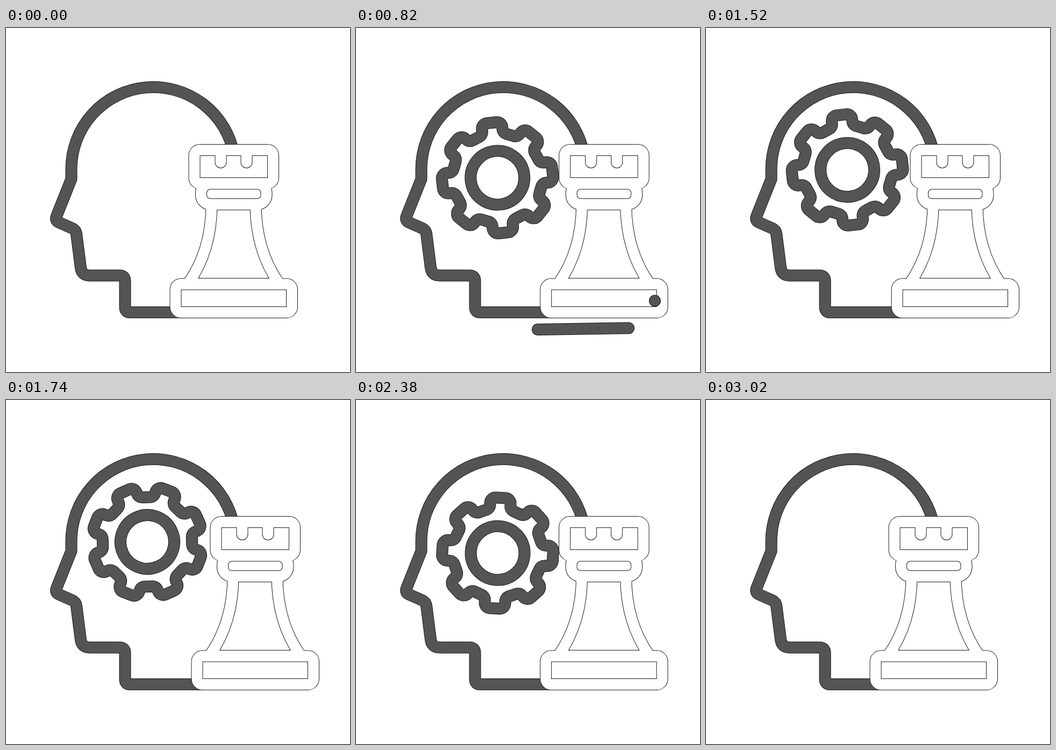
Recreate the animation shown at these times as an HTML page with a canvas. Size 640 by 640 pixels, loop 3120 ms.

```html
<!DOCTYPE html>
<html lang="en">
<head>
<meta charset="utf-8">
<style>
  html, body { margin: 0; width: 640px; height: 640px; overflow: hidden; background: #fff; }
  canvas { display: block; }
</style>
</head>
<body>
<canvas id="stage" width="640" height="640"></canvas>
<script>
const ctx = document.getElementById('stage').getContext('2d');
const LOOP = 3120, DARK = '#545454', EDGE = '#1c1c1c';

const head = new Path2D(`M380 529H231Q221.5 529 221.5 519.5V470.5Q221.5 460.5 211.5 460.5
  H156Q141 460.5 139 446L131 383Q130 376 124 373L98 361.5Q91 358 94 350L121.5 281V263.5
  A152.5 152.5 0 0 1 424 235`);

const rook = new Path2D();
rook.roundRect(350.5, 227, 146.5, 62, 10);
rook.roundRect(363, 289.5, 121.5, 38.5, 17);
rook.roundRect(315.5, 476.5, 216.5, 52.5, 10);
const legs = new Path2D('M382.5 328Q382.5 414 338.5 476H508.5Q464.5 414 464.5 328Z');
rook.addPath(legs);
const notches = new Path2D('M399.5 227V250M447.5 227V250');
rook.addPath(notches);

const gear = makeGear(8);

function makeGear(teeth) {
  const path = new Path2D(), step = 2 * Math.PI / teeth;
  const corners = [[82, -19], [103, -19], [103, 19], [82, 19]];
  const points = [];
  for (let i = 0; i < teeth; i++) {
    const c = Math.cos(i * step), s = Math.sin(i * step);
    for (const [x, y] of corners) points.push([x * c - y * s, x * s + y * c]);
  }
  const first = points[0], last = points[points.length - 1];
  path.moveTo((first[0] + last[0]) / 2, (first[1] + last[1]) / 2);
  points.forEach((p, i) => path.arcTo(...p, ...points[(i + 1) % points.length], 10));
  path.closePath();
  path.moveTo(50, 0);
  path.arc(0, 0, 50, 0, 2 * Math.PI);
  return path;
}

const progress = (t, from, to) => Math.min(1, Math.max(0, (t - from) / (to - from)));
const easeInOut = u => u < .5 ? 4 * u ** 3 : 1 - 4 * (1 - u) ** 3;

// Linear interpolation through [time, value] pairs.
function track(t, keys) {
  let value = keys[0][1];
  for (let i = 1; i < keys.length; i++)
    value += (keys[i][1] - keys[i - 1][1]) * progress(t, keys[i - 1][0], keys[i][0]);
  return value;
}

function outlined(path, color) {
  ctx.strokeStyle = EDGE;
  ctx.lineWidth = 22;
  ctx.stroke(path);
  ctx.strokeStyle = color;
  ctx.lineWidth = 20;
  ctx.stroke(path);
}

function drawGear(t) {
  const away = Math.max((1 - progress(t, 274, 1096)) ** 3, progress(t, 2050, 2930) ** 3);
  const angle = track(t, [[180, 8], [480, 45], [820, 83.7], [1520, 173.7], [1960, 228], [2380, 273], [3020, 345]]);
  ctx.save();
  ctx.beginPath();
  ctx.rect(0, 0, 420, 529);
  ctx.clip();
  ctx.translate(263 + 857 * away ** 2.5, 264 + 391 * away);
  ctx.rotate(angle * Math.PI / 180);
  outlined(gear, DARK);
  ctx.restore();
}

function drawRook(t) {
  const shift = easeInOut(progress(t, 260, 1000)) - easeInOut(progress(t, 2200, 2940));
  ctx.save();
  ctx.translate(40 * shift, 0);
  ctx.fillStyle = '#fff';
  ctx.fill(rook);
  ctx.fill(legs);
  outlined(rook, '#fff');
  ctx.restore();
}

function drawStreak(t, tailKeys, headKeys, y, slope) {
  if (t < headKeys[0][0] || t > tailKeys[tailKeys.length - 1][0] + 20) return;
  const x0 = tailKeys[0][1], tail = track(t, tailKeys), tip = track(t, headKeys);
  const line = new Path2D();
  line.moveTo(tail, y + slope * (tail - x0));
  line.lineTo(tip + .01, y + slope * (tip - x0));
  outlined(line, DARK);
}

function draw(now) {
  const t = now % LOOP;
  ctx.fillStyle = '#fff';
  ctx.fillRect(0, 0, 640, 640);
  ctx.lineJoin = 'round';
  ctx.lineCap = 'round';
  outlined(head, DARK);
  drawGear(t);
  drawRook(t);
  drawStreak(t, [[240, 370], [480, 445.5], [820, 556]], [[180, 370], [480, 508.5], [640, 556]], 507.5, 0);
  drawStreak(t, [[840, 338], [1100, 545]], [[560, 338], [820, 507], [960, 545]], 561, -.016);
  requestAnimationFrame(() => draw(performance.now()));
}
draw(0);
</script>
</body>
</html>
```
